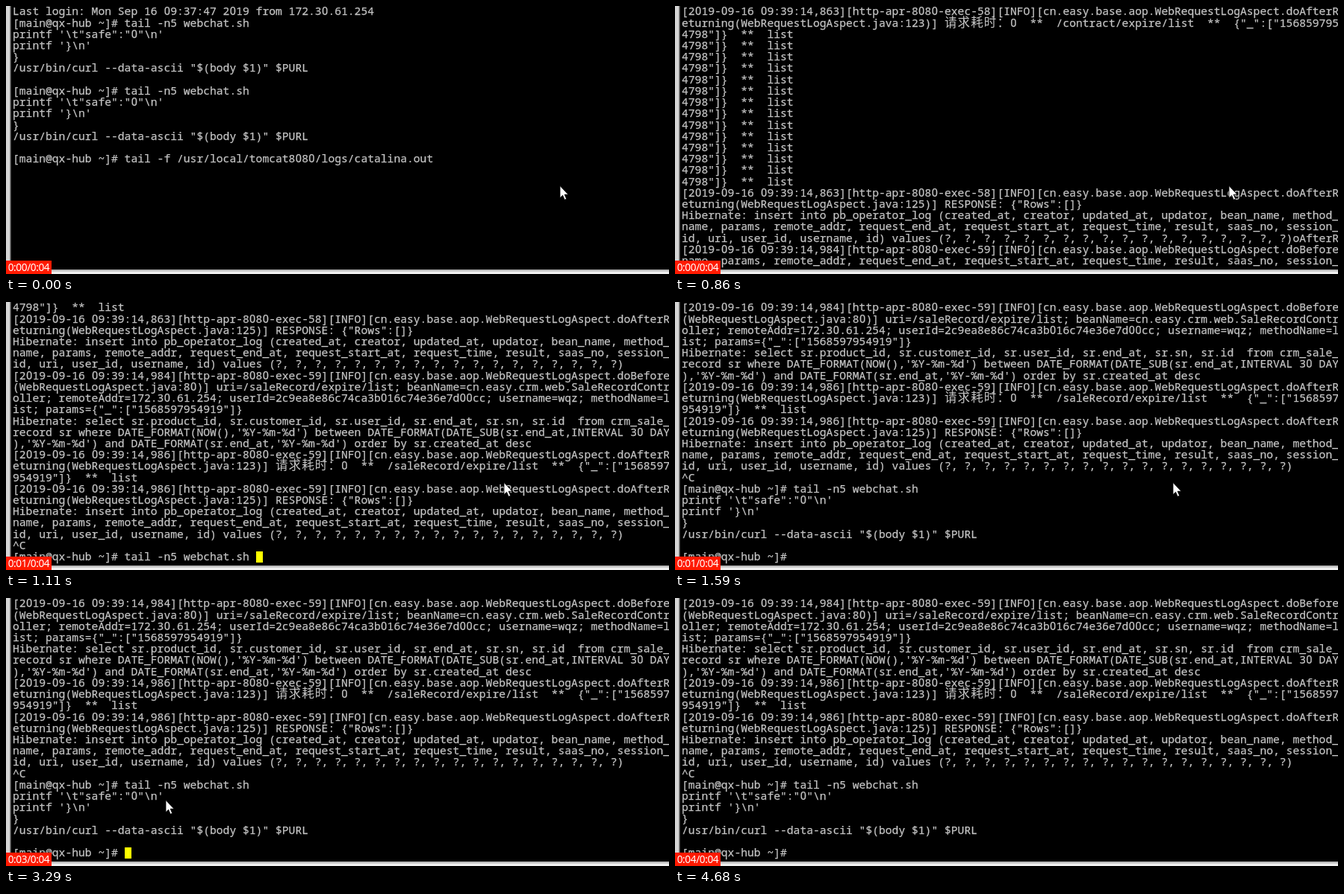
These frames come from a looping animation (888x360 px, 4.85 s). An HTML page:

```html
<!DOCTYPE html>
<html lang="en">
<head>
<meta charset="utf-8">
<title>Terminal log</title>
<style>
html, body { margin: 0; width: 100%; height: 100%; overflow: hidden; background: #000; }
svg { display: block; width: 888px; height: 360px; }
#rows { font: 14.667px "Noto Sans Mono", monospace; fill: #c4c4c4; stroke: #c4c4c4; stroke-width: .25; }
#rows .zero { font-family: Roboto, sans-serif; }
#rows .wide { font: 16.5px "Noto Sans CJK SC", "Noto Sans CJK", sans-serif; stroke: none; }
#clock { font: 13.6px "Noto Sans", sans-serif; letter-spacing: -.38px; fill: #fff; }
</style>
</head>
<body>
<svg viewBox="0 0 888 360" xmlns="http://www.w3.org/2000/svg">
  <rect width="888" height="360"/>
  <g id="rows"></g>
  <rect id="caret" width="9" height="15" fill="#ff0"/>
  <rect width="5" height="360" fill="#d6d6d6"/>
  <rect x="5" width="1.5" height="360" fill="#8c8c8c"/>
  <rect y="354" width="888" height="6" fill="#f0f0f0"/>
  <rect y="354" width="888" height="2.5" fill="#bcbcbc"/>
  <path id="mouse" d="M0 0V16.2L3.6 12.8L6.2 18.8L8.7 17.7L6.2 11.8H11Z" fill="#fff" stroke="#000" stroke-width=".8"/>
  <rect y="342" width="61" height="18" fill="#ff1a00"/>
  <text id="clock" x="2.7" y="356.3"></text>
</svg>
<script>
const LOOP = 4850, X0 = 9, CELL = 8.8, LINE = 15.22, BASE = 12.3;
const STEP = 78;
const $ = id => document.getElementById(id);

const prompt = '[main@qx-hub ~]# ';
const tailCmd = prompt + 'tail -n5 webchat.sh';
const script = [
  `printf '\\t"safe":"0"\\n'`,
  `printf '}\\n'`,
  '}',
  '/usr/bin/curl --data-ascii "$(body $1)" $PURL',
  ''
];
const head = (ms, thread, when) =>
  `[2019-09-16 09:39:14,${ms}][http-apr-8080-exec-${thread}][INFO]` +
  `[cn.easy.base.aop.WebRequestLogAspect.do${when}`;
const cost = (path, id) =>
  `eturning(WebRequestLogAspect.java:123)] 请求耗时：0  **  ${path}/expire/list  **  {"_":["${id}`;
const response = 'eturning(WebRequestLogAspect.java:125)] RESPONSE: {"Rows":[]}';
const insert = [
  'Hibernate: insert into pb_operator_log (created_at, creator, updated_at, updator, bean_name, method_',
  'name, params, remote_addr, request_end_at, request_start_at, request_time, result, saas_no, session_',
  'id, uri, user_id, username, id) values (' + Array(18).fill('?').join(', ') + ')'
];

const log = [
  'Last login: Mon Sep 16 09:37:47 2019 from 172.30.61.254',
  tailCmd, ...script,
  tailCmd, ...script,
  prompt + 'tail -f /usr/local/tomcat8080/logs/catalina.out',
  head(863, 58, 'AfterR'),
  cost('/contract', '156859795'),
  '4798"]}  **  list',
  head(863, 58, 'AfterR'),
  response, ...insert,
  head(984, 59, 'Before'),
  '(WebRequestLogAspect.java:80)] uri=/saleRecord/expire/list; beanName=cn.easy.crm.web.SaleRecordContr',
  'oller; remoteAddr=172.30.61.254; userId=2c9ea8e86c74ca3b016c74e36e7d00cc; username=wqz; methodName=l',
  'ist; params={"_":["1568597954919"]}',
  'Hibernate: select sr.product_id, sr.customer_id, sr.user_id, sr.end_at, sr.sn, sr.id  from crm_sale_',
  "record sr where DATE_FORMAT(NOW(),'%Y-%m-%d') between DATE_FORMAT(DATE_SUB(sr.end_at,INTERVAL 30 DAY",
  "),'%Y-%m-%d') and DATE_FORMAT(sr.end_at,'%Y-%m-%d') order by sr.created_at desc",
  head(986, 59, 'AfterR'),
  cost('/saleRecord', '1568597'),
  '954919"]}  **  list',
  head(986, 59, 'AfterR'),
  response, ...insert,
  '^C',
  tailCmd, ...script,
  prompt
];

// The half-repainted screen while the log scrolls past
const smear = [
  log[14], log[15], ...Array(14).fill(log[16]), ...log.slice(17, 21),
  log[21] + 'oAfterR', log[22], log[20]
];

const views = [
  [0, log.slice(0, 14)],
  [780, log.slice(0, 23)],
  [860, smear],
  [950, log.slice(14, 37)],
  [1020, log.slice(15, 37)],
  [1110, log.slice(16, 39)],
  [1490, log.slice(21, 44)],
  [1590, log.slice(22)]
];

// from, to, column, row
const carets = [
  [310, 780, 65, 13],
  [1110, 1490, 37, 22],
  [2040, 2500, 17, 22],
  [2980, 3525, 17, 22],
  [4070, 4680, 17, 22]
];

function rowMarkup(text, row) {
  let col = 0;
  const xs = [...text].map(ch => {
    const x = X0 + col * CELL + (ch === '0' ? 0.3 : 0);
    col += ch > '\u2fff' ? 2 : 1;
    return x.toFixed(1);
  });
  const body = text.replace(/ /g, '\u00a0')
    .replace(/0/g, '<tspan class="zero">0</tspan>')
    .replace(/[\u3000-\uffff]+/g, '<tspan class="wide">$&</tspan>');
  return `<text y="${(BASE + row * LINE).toFixed(2)}" x="${xs.join(' ')}">${body}</text>`;
}

const smooth = u => u * u * (3 - 2 * u);
const mix = (a, b, u) => a.map((v, i) => v + (b[i] - v) * u);

function mouseAt(t) {
  const rest = [667, 242.5], low = [214, 271.5], exit = [600, 355.5];
  const stepped = start => Math.floor((t - start) / STEP + 0.05);
  if (t < 1110) return [742, 241.5];
  if (t < 2750) return rest;
  if (t < 3290) return mix(rest, low, smooth(Math.min(7, stepped(2750) + 1) / 8));
  if (t < 3840) return mix(low, exit, smooth(Math.min(6, stepped(3290)) / 6));
  return null;
}

let shown = null;

function draw(t) {
  const view = views.filter(v => t >= v[0]).pop();
  if (view !== shown) {
    $('rows').innerHTML = view[1].map(rowMarkup).join('');
    shown = view;
  }

  const caret = carets.find(c => t >= c[0] && t < c[1]);
  $('caret').setAttribute('visibility', caret ? 'visible' : 'hidden');
  if (caret) {
    $('caret').setAttribute('x', Math.round(X0 + caret[2] * CELL));
    $('caret').setAttribute('y', Math.round(caret[3] * LINE));
  }

  const pos = mouseAt(t);
  $('mouse').setAttribute('visibility', pos ? 'visible' : 'hidden');
  if (pos) $('mouse').setAttribute('transform', `translate(${pos})`);

  const sec = [1020, 2040, 3060, 4070].filter(s => t >= s).length;
  $('clock').textContent = `0:0${sec}/0:04`;
}

const start = performance.now();
function tick() {
  draw((performance.now() - start) % LOOP);
  requestAnimationFrame(tick);
}
tick();
</script>
</body>
</html>
```
